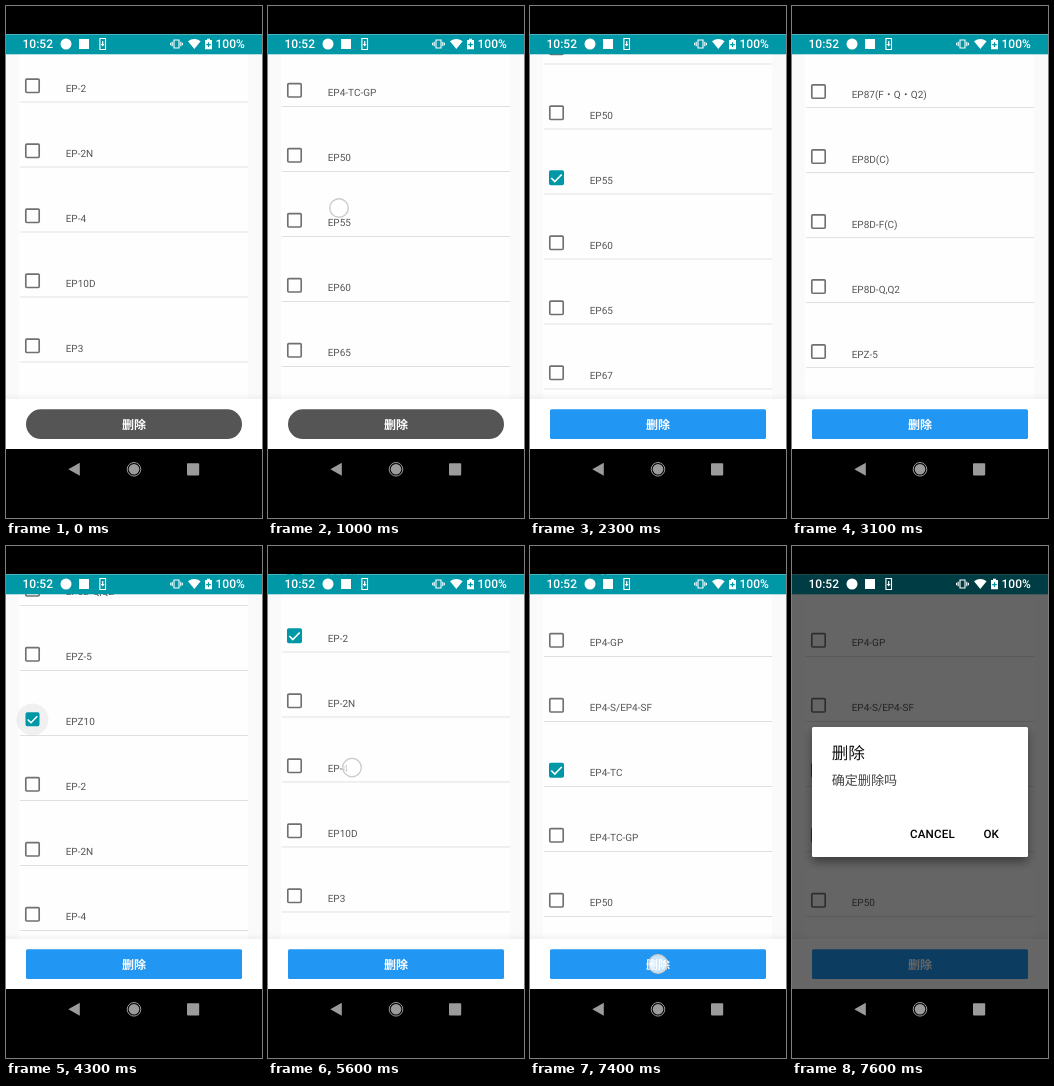
Recreate the animation shown at these times as an HTML page. Size 256 px wide and 512 px high, loop 8 s.

```html
<!DOCTYPE html>
<html lang="zh-CN">
<head>
<meta charset="utf-8">
<style>
html, body { margin: 0; width: 100%; height: 100%; overflow: hidden; background: #000; }
svg { display: block; width: 256px; height: 512px; font-family: Roboto, "Noto Sans CJK SC", "Noto Sans CJK", sans-serif; text-rendering: geometricPrecision; }
</style>
</head>
<body>
<svg viewBox="0 0 256 512">
  <defs>
    <linearGradient id="fade" x2="0" y2="1">
      <stop offset="0" stop-opacity="0"/><stop offset="1" stop-opacity=".04"/>
    </linearGradient>
    <filter id="shadow" x="-20%" y="-20%" width="140%" height="150%">
      <feDropShadow dx="0" dy="5" stdDeviation="5" flood-opacity=".4"/>
    </filter>
  </defs>

  <rect y="28" width="256" height="415" fill="#fafafa"/>
  <rect x="13" y="48" width="229" height="350" fill="#fefefe"/>
  <g id="list"></g>

  <rect y="387" width="256" height="6" fill="url(#fade)"/>
  <rect y="393" width="256" height="50" fill="#fff"/>
  <rect id="button" x="20" y="403.3" width="216" height="29.7"/>
  <text x="128" y="422.6" font-size="12" font-weight="700" fill="#fff" text-anchor="middle">删除</text>

  <rect y="28.3" width="256" height="20" fill="#0097a7"/>
  <rect id="dim" y="28" width="256" height="415"/>

  <g fill="#fff" font-size="12" font-weight="500">
    <text x="16.5" y="42.3">10:52</text>
    <text x="209.5" y="42.3">100%</text>
    <circle cx="60" cy="38" r="5.5"/>
    <rect x="73" y="33" width="10" height="10"/>
    <path d="M93.9 32.5h5.6v11h-5.6z" fill="none" stroke="#fff" stroke-width="1.1"/>
    <path d="M96.1 35h1.2v3h1.3l-1.9 2.4-1.9-2.4h1.3z"/>
    <path d="M168 34h5v8h-5z M166.2 35.8v4.4 M174.8 35.8v4.4 M164.6 36.8v2.4 M176.4 36.8v2.4" fill="none" stroke="#fff" stroke-width="1.1"/>
    <path d="M182 35.3q6.3-4.6 12.6 0l-6.3 7.7z"/>
    <path d="M199 34h2v-1.3h3V34h2v9.3h-7z"/>
    <path d="M202.5 36.2v4.8 M200.2 38.6h4.6" stroke="#0097a7" stroke-width="1.2"/>
  </g>

  <g id="dialog">
    <rect x="20" y="181" width="216" height="130" rx="1.6" fill="#fff" filter="url(#shadow)"/>
    <text x="39.7" y="213.3" font-size="16.6" fill="#111">删除</text>
    <text x="39.7" y="238.6" font-size="13.1" fill="#444">确定删除吗</text>
    <g font-size="11.6" font-weight="500" letter-spacing=".15" fill="#000">
      <text x="118" y="292">CANCEL</text>
      <text x="191.4" y="292">OK</text>
    </g>
  </g>

  <rect width="256" height="28"/>
  <rect y="443" width="256" height="69"/>
  <g fill="#9b9b9b">
    <path d="M62.3 463.3 73.8 456.8v13z"/>
    <circle cx="128" cy="463.3" r="5.3"/>
    <circle cx="128" cy="463.3" r="6.8" fill="none" stroke="#9b9b9b"/>
    <rect x="181" y="457.2" width="12.2" height="12.2" rx=".8"/>
  </g>
  <circle id="finger" r="9.3" fill="#fff" fill-opacity=".75" stroke="#cdcdcd" stroke-width="1.4"/>
</svg>
<script>
const LOOP = 8000, STEP = 100, PITCH = 65, TOP = 80, ROWS = 38;
const HOLD = 200, FRICTION = 1.83;
const models = ('EP-2 EP-2N EP-4 EP10D EP3 EP4 EP4-GP EP4-S/EP4-SF EP4-TC EP4-TC-GP EP50 EP55 EP60 ' +
  'EP65 EP67 EP70 EP75 EP80 EP85 EP87(F・Q・Q2) EP8D(C) EP8D-F(C) EP8D-Q,Q2 EPZ-5 EPZ10').split(' ');

// Each swipe moves the list by a distance; the finger starts at (x, y).
const swipes = [
  { at: 400, ms: 600, by: 580.5, x: 78, y: 370 },
  { at: 1000, ms: 500, by: 42.5, x: 71, y: 202 },
  { at: 2500, ms: 1200, by: 843.5, x: 78, y: 370 },
  { at: 5500, ms: 600, by: 523.5, x: 84, y: 370 },
  { at: 6100, ms: 300, by: 10.5, x: 84, y: 214 }
];
const taps = [
  { at: 1700, row: 11 }, { at: 4000, row: 24 }, { at: 4700, row: 25 }, { at: 6700, row: 33 }
];
const confirmAt = 7400;

const $ = id => document.getElementById(id);
const list = $('list'), button = $('button'), finger = $('finger');
const clamp = v => Math.min(1, Math.max(0, v));

function set(el, attrs) {
  for (const key in attrs) el.setAttribute(key, attrs[key]);
}

function add(parent, tag, attrs) {
  const el = document.createElementNS('http://www.w3.org/2000/svg', tag);
  set(el, attrs);
  return parent.appendChild(el);
}

function makeRow(i) {
  const g = add(list, 'g', { transform: `translate(0 ${TOP + i * PITCH})` });
  const ripple = add(g, 'circle', { cx: 26.5, r: 16, opacity: 0 });
  const box = add(g, 'g', {});
  const square = add(box, 'rect', {
    x: -6.7, y: -6.7, width: 13.4, height: 13.4, rx: 1, 'stroke-width': 1.65
  });
  const mark = add(box, 'path', {
    d: 'M-5.2 .2-1.7 3.7 5.2-3.3', fill: 'none', stroke: '#fff', 'stroke-width': 1.7
  });
  add(g, 'text', { x: 59.7, y: 5.8, 'font-size': 10, fill: '#555' })
    .textContent = models[i % models.length];
  add(g, 'rect', { x: 14, y: 15.7, width: 228, height: .6, fill: '#ccc' });
  return { ripple, box, square, mark };
}

const rows = Array.from({ length: ROWS }, (_, i) => makeRow(i));

function travel({ at, ms, by }, t) {
  return by * (1 - (1 - clamp((t - at) / ms)) ** FRICTION);
}

function drawRow(row, age) {
  const checked = age >= 200;
  const scale = checked ? .86 + .14 * clamp((age - 200) / 200) : 1;
  set(row.box, { transform: `translate(26.5 -.2) scale(${scale})` });
  set(row.square, { fill: checked ? '#0097a7' : 'none', stroke: checked ? '#0097a7' : '#707070' });
  set(row.mark, { opacity: checked ? 1 : 0 });
  set(row.ripple, { opacity: age >= 100 ? .055 * clamp((500 - age) / 200) : 0 });
}

function fingerAt(t, offset) {
  const swipe = swipes.find(s => t >= s.at && t < s.at + HOLD && offset > 0);
  if (swipe) return [swipe.x, swipe.y - travel(swipe, t)];
  const tap = taps.find(p => t >= p.at && t < p.at + HOLD);
  if (tap) return [27, TOP + tap.row * PITCH - offset];
  if (t === confirmAt) return [128, 418];
}

function draw(t) {
  const offset = swipes.reduce((sum, s) => sum + travel(s, t), 0);
  set(list, { transform: `translate(0 ${-offset})` });
  rows.forEach((row, i) => {
    const tap = taps.find(p => p.row === i);
    drawRow(row, tap ? t - tap.at : -1);
  });

  const active = t >= taps[0].at + HOLD;
  set(button, { fill: active ? '#2196f3' : '#555', rx: active ? 1.6 : 15 });

  const touch = fingerAt(t, offset);
  set(finger, { opacity: touch ? 1 : 0 });
  if (touch) set(finger, { cx: touch[0], cy: touch[1] });

  const open = clamp((t - confirmAt) / 200);
  set($('dim'), { opacity: .6 * open });
  set($('dialog'), { opacity: open });
}

let last = -1;
function tick() {
  const t = Math.floor(performance.now() % LOOP / STEP) * STEP;
  if (t !== last) draw(last = t);
  requestAnimationFrame(tick);
}
tick();
</script>
</body>
</html>
```
